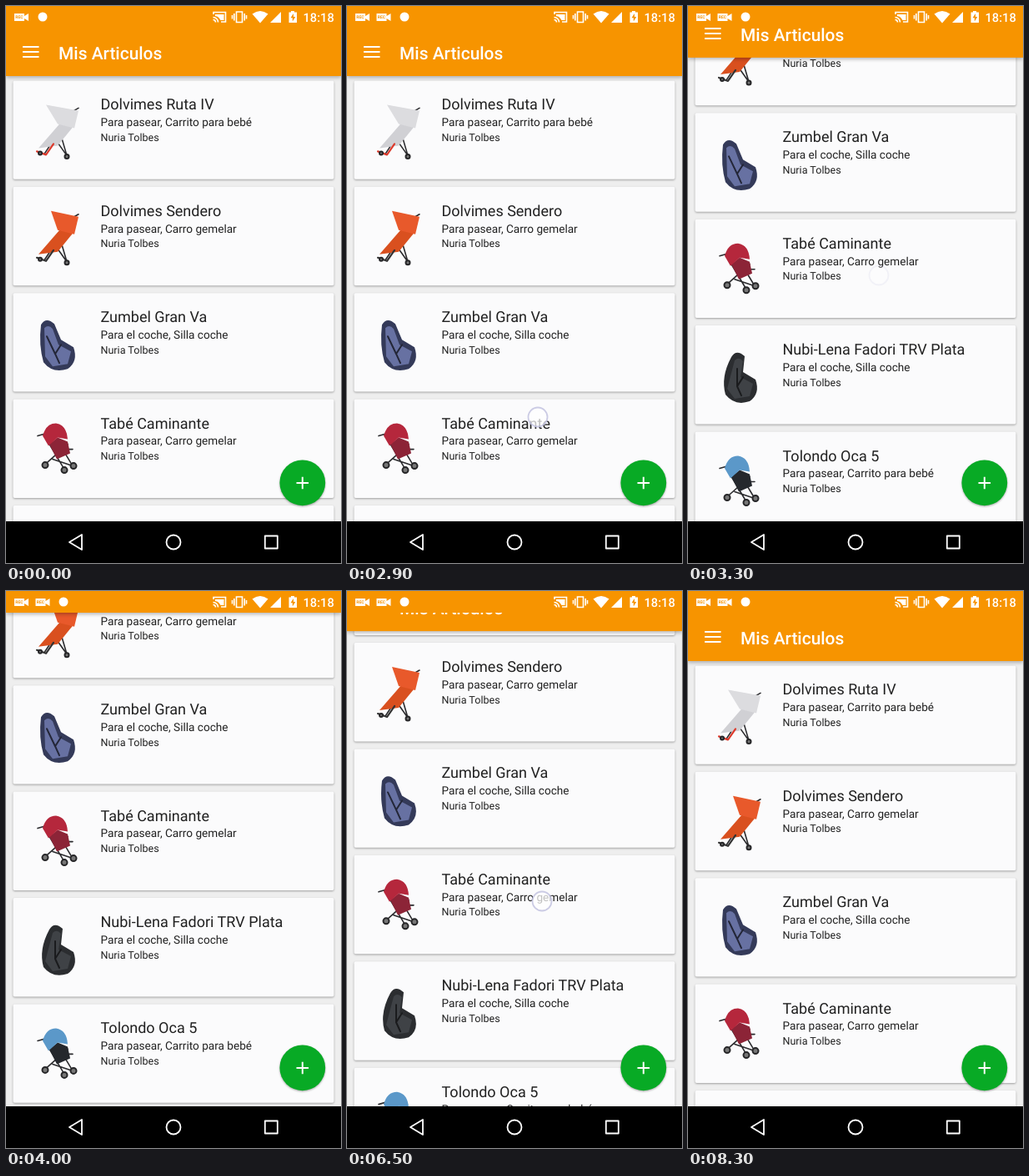
An HTML page that plays this animation: 402 px wide and 668 px high, repeating every 8400 ms.

```html
<!DOCTYPE html>
<html lang="es">
<head>
<meta charset="utf-8">
<title>Mis Articulos</title>
<style>
  html, body { margin: 0; height: 100%; overflow: hidden; background: #eee; }
  svg { display: block; width: 402px; height: 668px; font-family: Roboto, sans-serif; text-rendering: geometricPrecision; }
  .card > rect { fill: #fbfbfc; filter: drop-shadow(0 1px 1px #0005); }
  .name { font-size: 18px; }
  .kind { font-size: 13.6px; }
  .owner { font-size: 12.56px; }
  .line { fill: none; stroke-linejoin: round; stroke-linecap: round; }
  #bar { filter: drop-shadow(0 2px 2px #0004); }
  #fab circle { fill: #08aa25; filter: drop-shadow(0 1px 1px #0005); }
</style>
</head>
<body>
<svg viewBox="0 0 402 668">
  <rect width="402" height="668" fill="#eee"/>
  <g id="list" fill="#212121"></g>
  <path id="glow" d="M0 618V598Q201 571 402 598V618Z" fill="#f79400"/>

  <g id="bar">
    <rect width="402" height="84" fill="#f79400"/>
    <path d="M20 49h19.5M20 55h19.5M20 61h19.5" stroke="#fff" stroke-width="2"/>
    <text x="63" y="63.8" fill="#fff" font-size="20.9" font-weight="500">Mis Articulos</text>
  </g>

  <rect width="402" height="26" fill="#f79400"/>
  <g fill="#fff">
    <g id="rec">
      <path d="M10 9h12v3l5-3v9l-5-3v3h-12z"/>
      <text x="11.3" y="15.3" font-size="5" font-weight="700" fill="#f79400">REC</text>
    </g>
    <use id="rec2" href="#rec" x="25.5"/>
    <circle id="badge" cy="13" r="5.5"/>
    <g fill="none" stroke="#fff" stroke-width="1.6">
      <path d="M249 10V7.5H263.5V19H258M248.5 13.5a6 6 0 0 1 6 6M248.5 16.5a3 3 0 0 1 3 3"/>
      <path d="M276.5 7h7v12.5h-7zM273.8 9v8.5M271.5 11v4.5M286.2 9v8.5M288.5 11v4.5"/>
    </g>
    <path d="M251 10h10.5v7h-4q-2-4.5-6.5-5z"/>
    <path d="M295.5 9.500q9.500-7 19 0L305 20.500z"/>
    <path d="M317 20L330 7V20z"/>
    <path d="M339.5 7.5h2.5v-1.5h4v1.5h3v12.5h-9.5z"/>
    <path d="M345 9l-3.5 5.2h2.3v4.300l3.500-5.500h-2.300z" fill="#f79400"/>
    <text x="356.5" y="18.5" font-size="14.7" font-weight="500">18:18</text>
  </g>

  <g id="fab">
    <circle cx="355.8" cy="571.8" r="27.4"/>
    <path d="M348.5 572h14.600M355.800 564.700v14.600" stroke="#fff" stroke-width="2"/>
  </g>
  <circle id="touch" r="11.5" fill="#fffc" stroke="#c6c6e2" stroke-width="1.8"/>

  <rect y="618" width="402" height="50"/>
  <g fill="none" stroke="#fff" stroke-width="1.8" stroke-linejoin="round">
    <path d="M76 643L91 634V652Z"/>
    <circle cx="201" cy="643" r="8.5"/>
    <path d="M310.8 635.500h15v15h-15z"/>
  </g>
</svg>

<script>
const $ = id => document.getElementById(id);
const LOOP = 8400, STEP = 100, PITCH = 127.4;

const area = (d, fill) => `<path d="${d}" fill="${fill}"/>`;
const line = (d, stroke = '#2b2b2e', width = 1.6) =>
  `<path class="line" d="${d}" stroke="${stroke}" stroke-width="${width}"/>`;
const wheel = (x, y, r = 3.5) =>
  `<circle cx="${x}" cy="${y}" r="${r}" fill="#777" stroke="#262628" stroke-width="2"/>`;

// Simple product pictures, drawn in card coordinates
const buggy = (hood, seat, trim, shift = 0) =>
  line('M87 33L80 37L46 88M80 37L66 66L73 90M56 66L73 90') +
  area('M66 50L80 56L62 78L39 81Z', seat) +
  area(`M${54 + shift} 29L87 36L82 57L62 52Z`, hood) +
  line('M37 85L48 89L57 76', trim, 2.2) + wheel(41, 87, 2) + wheel(73, 91, 2.5);

const pram = (hood, seat) =>
  line('M38 44L45 42L70 84M74 54L47 78M56 72L80 80L68 60H80') +
  area('M52 54L62 46L74 51L77 65L61 72Z', seat) +
  area('M44 44Q48 29 60 29Q73 31 74 48L62 46L51 56Z', hood) +
  wheel(47, 79) + wheel(70, 85) + wheel(81, 80);

const carSeat = (shell, pad, belt, lean = 0) =>
  area(`M${42 + lean} 38Q${48 + lean} 28 ${58 + lean} 37L66 56L81 65Q87 82 74 91Q56 97 45 83Q39 62 ${42 + lean} 38Z`, shell) +
  area(`M${46 + lean} 42Q${51 + lean} 37 ${56 + lean} 43L63 62L78 70L74 85L56 88L47 76Z`, pad) +
  line(`M${49 + lean} 52L59 73L66 62M59 73L64 84`, belt, 2);

const stroll = 'Para pasear, Carro gemelar', baby = 'Para pasear, Carrito para bebé', car = 'Para el coche, Silla coche';
const items = [
  ['Dolvimes Ruta IV', baby, buggy('#dcdcdf', '#d0d0d4', '#dc3a2c', -6)],
  ['Dolvimes Sendero', stroll, buggy('#e8592b', '#d9501f', '#333')],
  ['Zumbel Gran Va', car, carSeat('#343a59', '#6771a2', '#232637')],
  ['Tabé Caminante', stroll, pram('#b5273c', '#8c2437')],
  ['Nubi-Lena Fadori TRV Plata', car, carSeat('#2b2d30', '#3f4246', '#1a1b1d', 10)],
  ['Tolondo Oca 5', baby, pram('#5b98c9', '#25282d')],
];
$('list').innerHTML = items.map(([name, kind, picture], i) => `
  <g class="card" transform="translate(0 ${89.4 + i * PITCH})">
    <rect x="8.5" width="385" height="118.4" rx="2"/>
    ${picture}
    <text class="name" x="113.5" y="35">${name}</text>
    <text class="kind" x="113.5" y="54.8">${kind}</text>
    <text class="owner" x="113.5" y="72.5">Nuria Tolbes</text>
  </g>`).join('');

const ramp = (t, start, length) => Math.min(1, Math.max(0, (t - start) / length));
const smooth = (t, start, length) => {
  const u = ramp(t, start, length);
  return u * u * (3 - 2 * u);
};
const fling = (t, start, length) => 1 - (1 - ramp(t, start, length)) ** 3;

const drags = [
  { start: 2900, x: 229, y: 493, dy: -170 },
  { start: 4890, x: 238, y: 480, dy: -101 },
  { start: 6300, x: 234, y: 292, dy: 120 },
];

function draw(now) {
  const t = Math.floor(now % LOOP / STEP) * STEP;
  const scroll = 231 * (fling(t, 2900, 670) - smooth(t, 6300, 520));
  const lift = 58 * (smooth(t, 3200, 238) - smooth(t, 6400, 238));
  $('list').setAttribute('transform', `translate(0 ${-scroll})`);
  $('bar').setAttribute('transform', `translate(0 ${-lift})`);
  $('glow').setAttribute('opacity', .13 * (smooth(t, 4900, 200) - smooth(t, 5200, 300)));

  const { start, x, y, dy } = drags.find(d => t < d.start + 500) || drags[0];
  $('touch').setAttribute('transform', `translate(${x} ${y + dy * ramp(t, start, 300)})`);
  $('touch').setAttribute('opacity', .9 * (ramp(t, start - 200, 200) - ramp(t, start + 200, 250)));

  const recording = t >= 400;
  $('rec2').setAttribute('opacity', recording ? 1 : 0);
  $('badge').setAttribute('cx', recording ? 69 : 44);
}

const begin = performance.now();
function tick() {
  draw(performance.now() - begin);
  requestAnimationFrame(tick);
}
tick();
</script>
</body>
</html>
```
